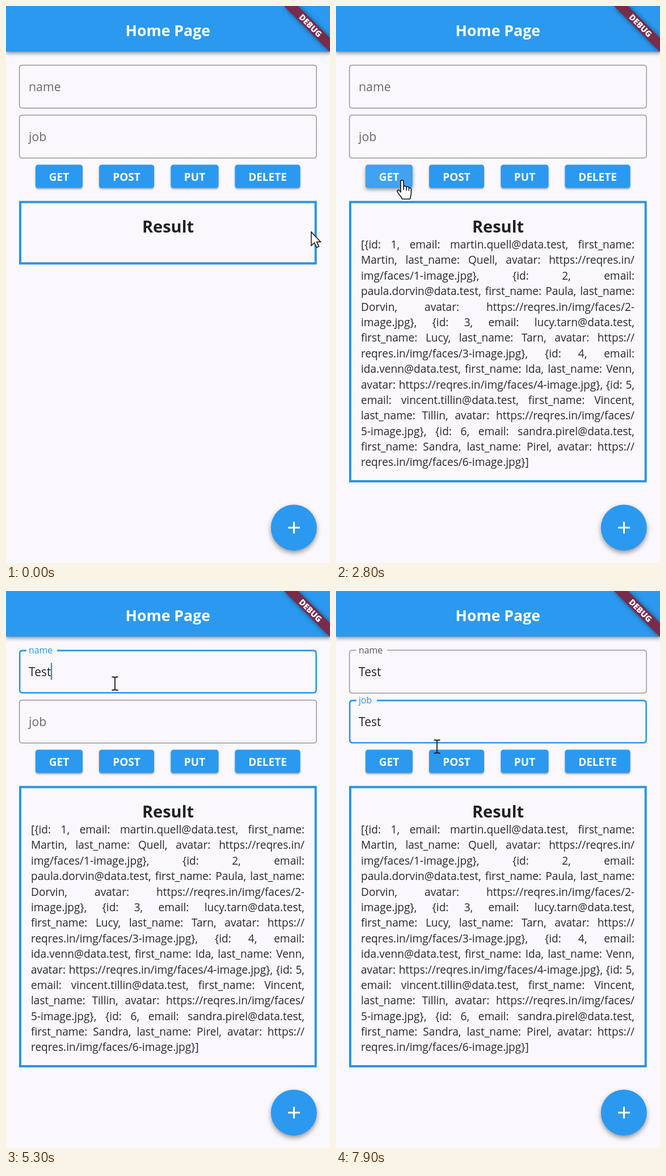
These frames come from a looping animation (571 px wide and 981 px high, 8000 ms). An HTML page:

```html
<!DOCTYPE html>
<html lang="en">
<head>
<meta charset="utf-8">
<style>
html, body { margin: 0; width: 100%; height: 100%; overflow: hidden; background: #faf8fc; }
body { position: relative; font-family: "Open Sans", "Noto Sans", sans-serif; }
svg { position: absolute; left: 0; top: 0; }
text { white-space: pre; }
#result { position: absolute; left: 44px; top: 407px; width: 482px; font-size: 19.1px; line-height: 27.4px; color: #29282b; }
#result div { display: flex; justify-content: space-between; height: 27.4px; white-space: nowrap; }
.shadow { filter: drop-shadow(0 2px 1.5px #0005); }
.raised { filter: drop-shadow(0 3px 3px #0006); }
</style>
</head>
<body>
<svg id="page" width="571" height="981" viewBox="0 0 571 981"></svg>
<div id="result"></div>
<svg id="top" width="571" height="981" viewBox="0 0 571 981"><g id="pointer"></g></svg>
<script>
const LOOP = 8000, BLUE = '#2b99ef', LINE = '#2b94e4', GREY = '#99979b', INK = '#212023';
const page = document.getElementById('page');
const result = document.getElementById('result');
const pointer = document.getElementById('pointer');
const clamp = v => Math.max(0, Math.min(1, v));
const mix = (a, b, k) => a + (b - a) * k;
const ease = k => k * k * (3 - 2 * k);

function add(tag, attrs, text = '') {
  const el = document.createElementNS('http://www.w3.org/2000/svg', tag);
  set(el, attrs);
  el.textContent = text;
  page.append(el);
  return el;
}
function set(el, attrs) {
  for (const key in attrs) el.setAttribute(key, attrs[key]);
}
function label(text, x, y, size, weight, fill, more) {
  return add('text', { x, y, 'font-size': size, 'font-weight': weight, fill, 'text-anchor': 'middle', ...more }, text);
}

// App bar and corner ribbon
add('rect', { width: 571, height: 80.5, fill: BLUE, style: 'filter:drop-shadow(0 3px 3px #0006)' });
label('Home Page', 285.3, 53, 26.7, 700, '#fff');
add('path', { d: 'M490 0H514.4L571 56.6V81Z', fill: '#792b4b', style: 'filter:drop-shadow(0 0 4px #0008)' });
label('DEBUG', 0, 5.2, 14.5, 800, '#fff', { transform: 'translate(536.6 34.4) rotate(45)' });

// Buttons
const buttons = [['GET', 52, 83], ['POST', 164, 97], ['PUT', 290.5, 84], ['DELETE', 403.5, 115]].map(([name, x, width]) => {
  const box = add('rect', { x, y: 279.5, width, height: 41, rx: 4.5, fill: BLUE, class: 'shadow' });
  label(name, x + width / 2, 308, 19, 700, '#fff');
  return { box, x, width };
});

// Result panel
const panel = add('rect', { x: 25, y: 345.3, width: 520.7, fill: 'none', stroke: LINE, 'stroke-width': 4 });
label('Result', 285.5, 399, 29, 700, INK);
result.innerHTML = `[{id: 1, email: martin.quell@data.test, first_name:
Martin, last_name: Quell, avatar: https://reqres.in/
img/faces/1-image.jpg}, {id: 2, email:
paula.dorvin@data.test, first_name: Paula, last_name:
Dorvin, avatar: https://reqres.in/img/faces/2-
image.jpg}, {id: 3, email: lucy.tarn@data.test,
first_name: Lucy, last_name: Tarn, avatar: https://
reqres.in/img/faces/3-image.jpg}, {id: 4, email:
ida.venn@data.test, first_name: Ida, last_name: Venn,
avatar: https://reqres.in/img/faces/4-image.jpg}, {id: 5,
email: vincent.tillin@data.test, first_name: Vincent,
last_name: Tillin, avatar: https://reqres.in/img/faces/
5-image.jpg}, {id: 6, email: sandra.pirel@data.test,
first_name: Sandra, last_name: Pirel, avatar: https://
reqres.in/img/faces/6-image.jpg}]`.split('\n')
  .map(line => `<div>${line.split(' ').map(word => `<span>${word}</span>`).join(' ')}</div>`).join('');

// Floating button
add('circle', { cx: 507.3, cy: 918.7, r: 40.5, fill: BLUE, style: 'filter:drop-shadow(0 4px 4px #0006)' });
add('path', { d: 'M497 918.7H518M507.5 908.5V929', stroke: '#fff', 'stroke-width': 3 });

// Outlined text field; times in ms for focus, blur and the first key
function field(name, top, gapWidth, focusAt, blurAt, typeAt) {
  const border = add('path', { fill: 'none' });
  const title = add('text', { x: 40 }, name);
  const value = add('text', { x: 40, y: top + 46.5, 'font-size': 21, fill: INK });
  const caret = add('rect', { y: top + 23, width: 2.4, height: 30, fill: LINE });
  const keyGap = 150;
  return t => {
    const focused = t >= focusAt && t < blurAt;
    const k = ease(clamp((t - focusAt) / 170));
    const w = focused ? 2.6 : 1.5;
    const l = 22.9 + w / 2, r = 547.9 - w / 2, y = top + w / 2, b = top + 77 - w / 2;
    set(border, {
      d: `M${36 + gapWidth * k} ${y}H${r - 5}q5 0 5 5V${b - 5}q0 5-5 5H${l + 5}q-5 0-5-5V${y + 5}q0-5 5-5H36`,
      stroke: focused ? LINE : GREY, 'stroke-width': w
    });
    set(title, {
      y: top + mix(46.5, 6.7, k), 'font-size': mix(21.3, 15.9, k),
      fill: focused ? LINE : t < focusAt ? '#69676b' : '#59575b'
    });
    const count = Math.max(0, Math.min(4, Math.floor((t - typeAt) / keyGap) + 1));
    value.textContent = 'Test'.slice(0, count);
    const lastKey = count ? typeAt + (count - 1) * keyGap : focusAt;
    const lit = focused && (t - lastKey) % 1000 < 500;
    set(caret, { x: 39.5 + (count ? value.getComputedTextLength() : 0), opacity: lit ? 1 : 0 });
  };
}
const fields = [
  field('name', 103.6, 54, 3750, 5750, 4700),
  field('job', 191.6, 36, 5750, LOOP, 6500)
];

// Pointer path: time, x, y
const stops = [[300, 538, 398], [1400, 115, 307], [3000, 115, 307], [3700, 192, 163], [7400, 192, 163], [7900, 178, 274]];
const shapes = {
  arrow: '<path d="M0 0V24l5.5-5l4 8.5l4-2l-4-8h7z" fill="#fff" stroke="#111" stroke-width="1.5"/>',
  hand: '<path d="M-1 2c0-3 5-3 5 0v9c1-2 5-1 5 1c1-1.5 4.5-1 4.5 1.5c1-1 4 0 4 2.5v7c0 4-2 6-2 10h-14c0-3-6-8-8.5-13c-1-3 3-4 5-1l1 2z' +
    'M4 11v6M9 12v6M13.5 13.5v5" fill="#fff" stroke="#111" stroke-width="1.6" stroke-linejoin="round"/>',
  beam: '<path d="M-5.5-11.5h4l1.5 1.5l1.5-1.5h4M0-10V10M-5.5 11.5h4l1.5-1.5l1.5 1.5h4" fill="none" stroke="#1c1c1c" stroke-width="1.8"/>'
};
function pointerAt(t) {
  const i = stops.findIndex(s => s[0] > t);
  if (i === 0) return stops[0].slice(1);
  if (i < 0) return stops.at(-1).slice(1);
  const [a, b] = [stops[i - 1], stops[i]];
  const k = ease((t - a[0]) / (b[0] - a[0]));
  return [mix(a[1], b[1], k), mix(a[2], b[2], k)];
}

function draw() {
  const t = Math.floor(performance.now() % LOOP / 100) * 100;
  const [x, y] = pointerAt(t);
  const hovered = buttons.find(b => y > 279 && y < 321 && x > b.x && x < b.x + b.width);
  for (const b of buttons) {
    set(b.box, { fill: b === hovered ? '#40a2f0' : BLUE, class: b === hovered ? 'raised' : 'shadow' });
  }
  const inField = x > 23 && x < 548 && (y > 103 && y < 181 || y > 191 && y < 276);
  pointer.innerHTML = shapes[hovered ? 'hand' : inField ? 'beam' : 'arrow'];
  set(pointer, { transform: `translate(${x} ${y})` });
  fields.forEach(update => update(t));
  const loaded = t >= 2800;
  result.style.visibility = loaded ? 'visible' : 'hidden';
  set(panel, { height: loaded ? 491.7 : 108 });
  requestAnimationFrame(draw);
}
draw();
</script>
</body>
</html>
```
